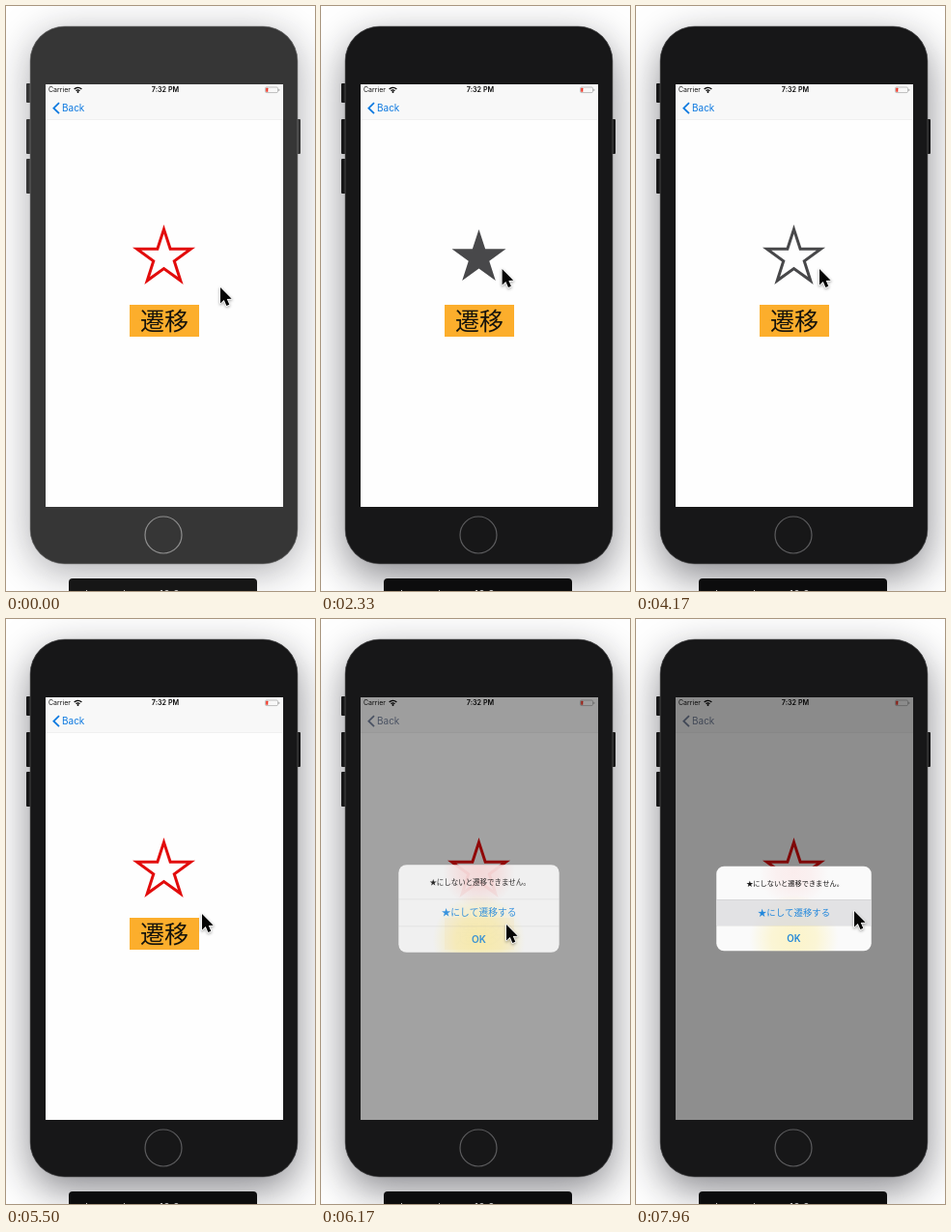
Write an HTML page with a canvas that moves like this. It is 320 px wide and 605 px high and loops after 8 s.

```html
<!DOCTYPE html>
<html lang="ja">
<head>
<meta charset="utf-8">
<style>
html, body { margin: 0; width: 100%; height: 100%; overflow: hidden; background: #fff; }
canvas { display: block; width: 100vw; height: 100vh; }
</style>
</head>
<body>
<canvas id="stage"></canvas>
<script>
const W = 320, H = 605, LOOP = 8000;
const LATIN = 'Inter, "Liberation Sans", sans-serif';
const CJK = '"Noto Sans CJK JP", "Noto Sans CJK", sans-serif';
const RED = '#e20c0c';
const canvas = document.getElementById('stage');
const ctx = canvas.getContext('2d');

// time, x, y of the pointer tip
const POINTER = [
  [0, 222, 291], [850, 168, 267], [1200, 168, 267], [1600, 187, 272],
  [4170, 190, 272], [4900, 190, 272], [5500, 203, 305], [5800, 192, 316],
  [6500, 192, 316], [7400, 226, 302], [8000, 226, 302]
];

// The first click only focuses the window; steady taps then toggle the star.
const FOCUS_AT = 1150;
const FIRST_TAP = 1650, TAP_GAP = 614, TAP_COUNT = 6, TAP_HOLD = 110;
const BUTTON_TAP_AT = 5930, ALERT_AT = 6035, ROW_PRESS_AT = 7750;

function pointerAt(t) {
  const i = Math.max(1, POINTER.findIndex(p => p[0] > t));
  const [t0, x0, y0] = POINTER[i - 1], [t1, x1, y1] = POINTER[i];
  const u = (t - t0) / (t1 - t0), e = u * u * (3 - 2 * u);
  return [x0 + (x1 - x0) * e, y0 + (y1 - y0) * e];
}

function starAt(t) {
  const n = Math.floor((t - FIRST_TAP) / TAP_GAP);
  if (n < 0 || n >= TAP_COUNT) return { filled: false, pressed: false };
  const pressed = t - FIRST_TAP - n * TAP_GAP < TAP_HOLD;
  return { pressed, filled: (n + (pressed ? 0 : 1)) % 2 === 1 };
}

function box(x, y, w, h, r, fill) {
  ctx.beginPath();
  ctx.roundRect(x, y, w, h, r);
  if (fill) { ctx.fillStyle = fill; ctx.fill(); }
}

function poly(points, closed) {
  ctx.beginPath();
  points.forEach(([x, y]) => ctx.lineTo(x, y));
  if (closed) ctx.closePath();
}

function label(str, x, y, font, color, align = 'center') {
  ctx.font = font;
  ctx.fillStyle = color;
  ctx.textAlign = align;
  ctx.fillText(str, x, y);
}

function glow(x, y, r, rgb, alpha) {
  const g = ctx.createRadialGradient(x, y, 0, x, y, r);
  g.addColorStop(0, `rgba(${rgb},${alpha})`);
  g.addColorStop(0.5, `rgba(${rgb},${alpha * 0.75})`);
  g.addColorStop(1, `rgba(${rgb},0)`);
  ctx.fillStyle = g;
  ctx.fillRect(x - r, y - r, r * 2, r * 2);
}

function drawPhone(focused, scale) {
  const body = focused ? '#171718' : '#363636';
  ctx.fillStyle = '#fff';
  ctx.fillRect(0, 0, W, H);

  ctx.save();
  ctx.shadowColor = `rgba(20,20,30,${focused ? 0.5 : 0.36})`;
  ctx.shadowBlur = 42 * scale;
  ctx.shadowOffsetY = (focused ? 14 : 8) * scale;
  box(25, 21, 277, 556, 36, body);
  ctx.restore();

  for (const [x, y, h] of [[21, 80, 20], [21, 117, 36], [21, 158, 36], [300, 117, 36]])
    box(x, y, 5, h, 1, body);
  box(25, 21, 277, 556, 36, body);
  ctx.lineWidth = 1;
  ctx.strokeStyle = focused ? 'rgba(100,100,102,0.6)' : 'rgba(130,130,130,0.6)';
  ctx.stroke();

  ctx.beginPath();
  ctx.arc(163, 547, 19, 0, Math.PI * 2);
  ctx.lineWidth = 1.2;
  ctx.strokeStyle = focused ? '#5c5c5e' : '#8e8e8e';
  ctx.stroke();

  box(65, 592, 195, 20, 4, focused ? '#0c0c0d' : '#161616');
  label('Large phone - 10.2', 82, 612, '11px ' + LATIN, '#d0d0d0', 'left');
}

function drawScreen(dimmed) {
  ctx.fillStyle = '#fefefe';
  ctx.fillRect(41, 81, 246, 437);
  ctx.fillStyle = '#f8f8f8';
  ctx.fillRect(41, 81, 246, 37);
  ctx.fillStyle = '#e6e6e6';
  ctx.fillRect(41, 117.5, 246, 0.5);

  label('Carrier', 44, 89.4, '7px ' + LATIN, '#111', 'left');
  label('7:32 PM', 165, 89.4, '600 7.2px ' + LATIN, '#080808');

  ctx.strokeStyle = '#080808';
  ctx.lineWidth = 1.4;
  for (const r of [2.6, 5.2]) {
    ctx.beginPath();
    ctx.arc(74.5, 89.6, r, -Math.PI * 0.76, -Math.PI * 0.24);
    ctx.stroke();
  }
  ctx.beginPath();
  ctx.arc(74.5, 89, 1, 0, Math.PI * 2);
  ctx.fillStyle = '#080808';
  ctx.fill();

  box(268.5, 84, 13, 5.6, 1.3);
  ctx.lineWidth = 0.7;
  ctx.strokeStyle = '#a4a4a4';
  ctx.stroke();
  box(269.3, 84.8, 2, 4, 0.4, '#f03020');
  box(282.3, 85.7, 1, 2.2, 0.4, '#a4a4a4');

  const tint = dimmed ? '#74809a' : '#0f7ae0';
  poly([[55, 100.2], [49.4, 105.7], [55, 111.2]]);
  ctx.lineWidth = 1.8;
  ctx.strokeStyle = tint;
  ctx.stroke();
  label('Back', 58, 109.4, '10px ' + LATIN, tint, 'left');
}

function drawStar({ filled, pressed }) {
  const points = Array.from({ length: 10 }, (_, i) => {
    const r = i % 2 ? 11.3 : 29.4, a = i * Math.PI / 5 - Math.PI / 2;
    return [163.5 + r * Math.cos(a), 260.3 + r * Math.sin(a)];
  });
  const color = pressed ? '#48484a' : RED;
  poly(points, true);
  if (filled) {
    ctx.fillStyle = color;
    ctx.fill();
  } else {
    ctx.lineWidth = 3;
    ctx.strokeStyle = color;
    ctx.stroke();
  }
}

function drawButton(pressed) {
  ctx.fillStyle = '#fcae2c';
  ctx.fillRect(128, 309, 72, 33);
  label('遷移', 164, 335, '25px ' + CJK, pressed ? 'rgba(20,18,10,0.2)' : '#17140c');
}

function drawAlert(k, rowPressed) {
  const shade = Math.round(255 * (1 - 0.44 * k));
  ctx.globalCompositeOperation = 'multiply';
  ctx.fillStyle = `rgb(${shade},${shade},${shade})`;
  ctx.fillRect(41, 81, 246, 437);
  ctx.globalCompositeOperation = 'source-over';

  ctx.save();
  const s = 1.2 - 0.2 * k;
  ctx.translate(163.5, 299.5);
  ctx.scale(s, s);
  ctx.translate(-163.5, -299.5);
  ctx.globalAlpha = Math.min(1, k * 1.1);
  box(83.25, 255.75, 160.5, 87.5, 8, '#fafafa');
  ctx.clip();
  glow(163.5, 262, 36, '255,140,140', 0.12 + 0.8 * (1 - k));
  glow(163.5, 331, 46, '255,232,110', 0.35 + (1 - k));
  if (rowPressed) {
    ctx.fillStyle = 'rgba(218,218,220,0.75)';
    ctx.fillRect(83, 290, 161, 27);
  }
  ctx.fillStyle = 'rgba(150,150,150,0.3)';
  ctx.fillRect(83, 290, 161, 0.5);
  ctx.fillRect(83, 317, 161, 0.5);
  label('★にしないと遷移できません。', 164.5, 276, '500 7.2px ' + CJK, '#141414');
  label('★にして遷移する', 163.5, 307.2, '9.4px ' + CJK, '#2388dc');
  label('OK', 163.5, 333.8, '600 9.7px ' + LATIN, '#2086d8');
  ctx.restore();
}

function drawPointer(x, y, scale) {
  ctx.save();
  ctx.translate(x, y);
  ctx.scale(0.94, 0.94);
  poly([[0, 0], [0, 17.6], [4, 13.9], [6.8, 20.3], [9.9, 19], [7.2, 12.7], [12.4, 12.5]], true);
  ctx.shadowColor = 'rgba(0,0,0,0.4)';
  ctx.shadowBlur = 3 * scale;
  ctx.shadowOffsetY = 1.2 * scale;
  ctx.lineWidth = 1.6;
  ctx.lineJoin = 'round';
  ctx.strokeStyle = '#fff';
  ctx.stroke();
  ctx.shadowColor = 'transparent';
  ctx.fillStyle = '#050505';
  ctx.fill();
  ctx.restore();
}

function draw(t) {
  const scale = window.devicePixelRatio || 1;
  const w = Math.round(W * scale), h = Math.round(H * scale);
  if (canvas.width !== w || canvas.height !== h) {
    canvas.width = w;
    canvas.height = h;
  }
  ctx.setTransform(scale, 0, 0, scale, 0, 0);
  const alertOn = t >= ALERT_AT;
  drawPhone(t >= FOCUS_AT, scale);
  drawScreen(alertOn);
  drawStar(starAt(t));
  drawButton(t >= BUTTON_TAP_AT);
  if (alertOn) drawAlert(1 - Math.exp((ALERT_AT - t) / 80), t >= ROW_PRESS_AT);
  drawPointer(...pointerAt(t), scale);
}

const start = performance.now();
function tick() {
  draw((performance.now() - start) % LOOP);
  requestAnimationFrame(tick);
}
tick();
</script>
</body>
</html>
```
